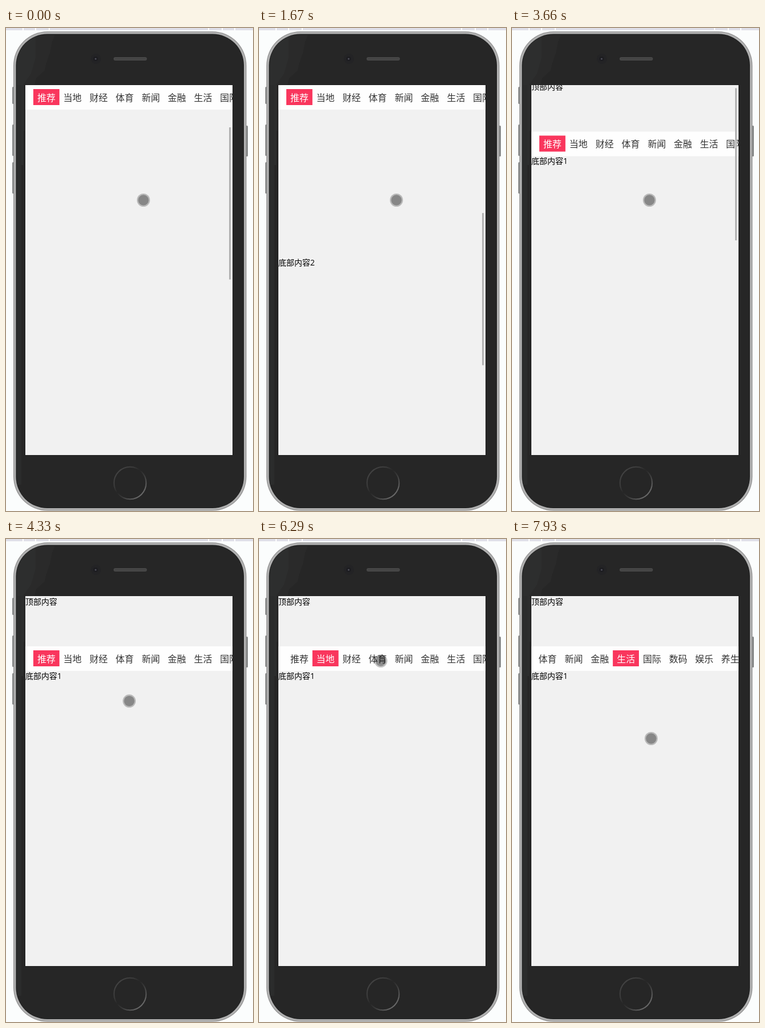
These frames come from a looping animation (434 px wide and 846 px high, 8 s). An HTML page:

```html
<!DOCTYPE html>
<html lang="zh">
<head>
<meta charset="utf-8">
<title>Sticky tabs</title>
<style>
  html, body { margin: 0; width: 100%; height: 100%; overflow: hidden; background: #fbfdfd; }
  svg { display: block; width: 100%; height: 100%; }
  text { font-family: "Open Sans", "Noto Sans CJK SC", "Noto Sans CJK", sans-serif; font-size: 14px; fill: #000; }
  #tabs text { font-size: 16px; fill: #333; }
  #tabs text.on { fill: #fff; }
</style>
</head>
<body>
<svg viewBox="0 0 434 846" xmlns="http://www.w3.org/2000/svg">
  <defs>
    <clipPath id="screen"><rect x="34" y="100" width="364" height="648"/></clipPath>
    <clipPath id="body"><rect x="19" y="12" width="398" height="828" rx="52"/></clipPath>
    <linearGradient id="ring" x1="0" y1="0" x2="1" y2="1">
      <stop offset="0" stop-color="#484848"/>
      <stop offset=".3" stop-color="#3c3c3c"/>
      <stop offset=".45" stop-color="#262626"/>
      <stop offset=".6" stop-color="#3a3a3a"/>
      <stop offset="1" stop-color="#858585"/>
    </linearGradient>
  </defs>

  <rect width="434" height="846" fill="#fbfdfd"/>
  <rect width="434" height="4" fill="#e0e0e9"/>
  <path d="M30 0v4M52 0v4M76 0v4M356 0v4M380 0v4M402 0v4" stroke="#fff" stroke-width="2"/>

  <g fill="#858787">
    <rect x="11" y="103" width="4" height="30" rx="1.5"/>
    <rect x="11" y="169" width="4" height="55" rx="1.5"/>
    <rect x="11" y="235" width="4" height="55" rx="1.5"/>
    <rect x="421" y="171" width="4" height="54" rx="1.5"/>
  </g>
  <rect x="13" y="6" width="409.500" height="839.500" rx="60" fill="#8c8c8c"/>
  <rect x="14" y="7" width="407.500" height="837.500" rx="59" fill="#b0b0b0"/>
  <rect x="17.500" y="10.500" width="400.500" height="830.500" rx="55" fill="#1d1e1e"/>
  <rect x="19" y="12" width="398" height="828" rx="53" fill="#262626"/>
  <g clip-path="url(#body)">
    <path d="M19 12H86L81 24L77 44L70 64L68 74L53 88L50 100H34V180H19Z" fill="#2a2a2a"/>
    <path d="M19 12H52V52L44 80L30 100V240H19Z" fill="#2d2e2e"/>
    <rect x="19" y="100" width="8" height="700" fill="#2b2c2c"/>
  </g>

  <circle cx="158" cy="54" r="9" fill="#232325"/>
  <circle cx="157.500" cy="54" r="4" fill="#1c1c20"/>
  <circle cx="157.500" cy="54" r="1.600" fill="#4e4e58"/>
  <rect x="189" y="51" width="58.500" height="6" rx="3" fill="#484848"/>
  <path d="M192 54H245" stroke="#3d3d3d" stroke-width="2" stroke-dasharray="1 1"/>
  <circle cx="218" cy="797" r="28.200" fill="none" stroke="url(#ring)" stroke-width="2"/>

  <rect x="33.500" y="99.500" width="365" height="649" fill="#1a1a1a"/>
  <g clip-path="url(#screen)">
    <rect x="34" y="100" width="364" height="648" fill="#f1f1f1"/>
    <g id="page">
      <text x="34" y="115">顶部内容</text>
      <text x="34" y="245">底部内容1</text>
      <text x="34" y="947">底部内容2</text>
    </g>
    <g id="nav">
      <rect x="34" width="364" height="43" fill="#fefefe"/>
      <g id="tabs"><rect id="mark" y="7" width="45.860" height="28" fill="#f9365d"/></g>
    </g>
    <rect id="thumb" x="392" width="3" height="266.500" fill="#b2b2b2"/>
    <g id="touch">
      <circle r="11.500" fill="#000" fill-opacity=".23"/>
      <circle r="9.200" fill="#000" fill-opacity=".27"/>
    </g>
  </g>
</svg>
<script>
const $ = id => document.getElementById(id);
const LOOP = 8000, STEP = 131, LEAD = 40, PITCH = 45.86, NAV_TOP = 188;
const names = '推荐 当地 财经 体育 新闻 金融 生活 国际 数码 娱乐 养生'.split(' ');

const labels = names.map((name, i) => {
  const label = document.createElementNS('http://www.w3.org/2000/svg', 'text');
  label.setAttribute('x', 55 + i * PITCH);
  label.setAttribute('y', 27.5);
  label.textContent = name;
  return $('tabs').appendChild(label);
});

const ramp = (t, from, to) => Math.min(1, Math.max(0, (t - from) / (to - from)));
const ease = (t, from, to) => {
  const p = ramp(t, from, to);
  return p * p * (3 - 2 * p);
};
const move = (id, x, y) => $(id).setAttribute('transform', `translate(${x} ${y})`);

// Two drags down the page, two back to the top
const scrollAt = t => 171
  + 181 * ramp(t, 0, 740)
  + 258 * ramp(t, 910, 1940) ** 1.4
  - 393 * ramp(t, 2230, 3290)
  - 217 * ramp(t, 3280, 3680);

// The tab strip centres the tab that was tapped
const tabShiftAt = t => 8 * ease(t, 6450, 6840) + 138 * ease(t, 7460, 7860);

const activeAt = t => t < 5240 ? 0 : t < 6550 ? 1 : t < 7460 ? 3 : 6;

// Pointer trips: each eases to a spot, sagging on the way
const trips = [
  { from: 4050, to: 4980, x: 121.5, y: 216.5, sag: 0 },
  { from: 5240, to: 6290, x: 214, y: 213.5, sag: 49 },
  { from: 6450, to: 7460, x: 344, y: 212, sag: 77 },
  { from: 7520, to: 7860, x: 244.5, y: 349.5, sag: 0 }
];

function pointerAt(t) {
  let x = 241.5, y = 301.5;
  for (const trip of trips) {
    const p = ease(t, trip.from, trip.to);
    x += (trip.x - x) * p;
    y += (trip.y - y) * p + trip.sag * Math.sin(Math.PI * p);
  }
  return [x, y];
}

function draw(time) {
  const t = Math.floor((time + LEAD) / STEP) * STEP; // the screen refreshes in even steps
  const scroll = scrollAt(t), active = activeAt(t);
  move('page', 0, -scroll);
  move('nav', 0, Math.max(100, NAV_TOP - scroll));
  move('tabs', -tabShiftAt(t), 0);
  move('touch', ...pointerAt(t));
  $('mark').setAttribute('x', 48 + active * PITCH);
  labels.forEach((label, i) => label.classList.toggle('on', i === active));
  $('thumb').setAttribute('y', 102.7 + scroll * 0.417);
  $('thumb').setAttribute('opacity', 1 - ramp(t, 4050, 4310));
}

const start = performance.now();
function tick() {
  draw((performance.now() - start) % LOOP);
  requestAnimationFrame(tick);
}
tick();
</script>
</body>
</html>
```
